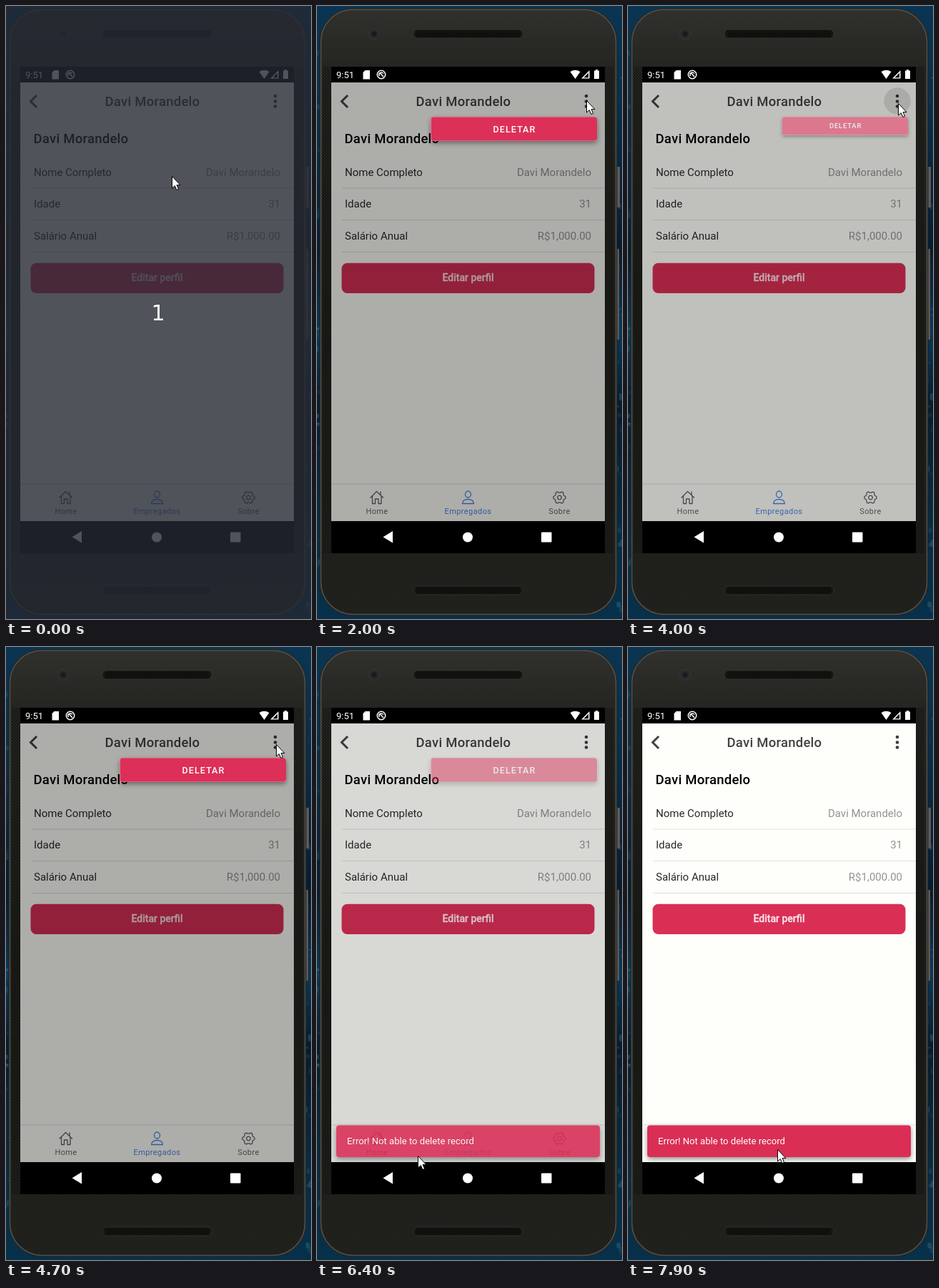
Animation of 427x858 px, one loop 8 s. Source, as an HTML page:

```html
<!DOCTYPE html>
<html lang="pt">
<head>
<meta charset="utf-8">
<title>Perfil</title>
<style>
  html, body { margin: 0; width: 100%; height: 100%; overflow: hidden; background: #08192a; }
  svg { display: block; width: 427px; height: 858px; font-family: Roboto, sans-serif; }
  .title { font-size: 18.5px; font-weight: 500; letter-spacing: .25px; }
  .row { font-size: 15px; fill: #2a2a2a; }
  .note { font-size: 15px; fill: #949494; text-anchor: end; }
  .button { font-size: 14px; font-weight: 500; fill: #fbe3e8; stroke: #fbe3e8; stroke-width: .35px; text-anchor: middle; }
  .tab { font-size: 11px; letter-spacing: .4px; text-anchor: middle; }
  .icon { fill: none; stroke-width: 1.3; stroke-linejoin: round; stroke-linecap: round; }
  .delete { font-size: 12.5px; font-weight: 500; letter-spacing: 1.1px; fill: #fff; text-anchor: middle; }
  .toast { font-size: 13.1px; fill: #fff; }
  .count { font: 30px "DejaVu Sans", sans-serif; fill: #fff; text-anchor: middle; }
</style>
</head>
<body>
<svg viewBox="0 0 427 858">
  <defs>
    <linearGradient id="wall" x2="0" y2="1">
      <stop offset="0" stop-color="#0a3552"/>
      <stop offset=".2" stop-color="#082c47"/>
      <stop offset=".4" stop-color="#061c30"/>
      <stop offset=".53" stop-color="#0a3856"/>
      <stop offset=".65" stop-color="#061c2e"/>
      <stop offset=".85" stop-color="#072c44"/>
      <stop offset="1" stop-color="#07304a"/>
    </linearGradient>
    <linearGradient id="body" x2="0" y2="1">
      <stop offset="0" stop-color="#30302d"/>
      <stop offset=".09" stop-color="#252622"/>
      <stop offset=".5" stop-color="#1c1d19"/>
      <stop offset="1" stop-color="#20211d"/>
    </linearGradient>
    <pattern id="mesh" width="4" height="4" patternUnits="userSpaceOnUse">
      <path d="M0 0h2v2h-2zM2 2h2v2h-2z" fill="#0b0c09"/>
    </pattern>
    <filter id="shadow" x="-10%" y="-30%" width="120%" height="190%">
      <feDropShadow dx="0" dy="3" stdDeviation="3.5" flood-opacity=".42"/>
    </filter>
    <clipPath id="app"><rect x="20" y="107" width="383" height="614"/></clipPath>
  </defs>

  <rect width="427" height="858" fill="url(#wall)"/>
  <g id="streaks" fill="#4b9cc0"></g>

  <!-- phone -->
  <path d="M420 225h4v57h-4zM420 340h3v127h-3z" fill="#625b57"/>
  <rect x="3.500" y="3" width="417" height="850.500" rx="47" fill="#252522"/>
  <rect x="5.500" y="5" width="413" height="846.500" rx="45" fill="url(#body)" stroke="#504f4b" stroke-width="1.500"/>
  <path d="M8 85h12v681H8zM403 85h12v681h-12z" fill="url(#mesh)" opacity=".55"/>
  <g fill="#151612" stroke="#393a36" stroke-width=".6">
    <rect x="135" y="33" width="153" height="12" rx="6"/>
    <rect x="135" y="812" width="153" height="12" rx="6"/>
  </g>
  <path d="M139 34h145v10H139zM139 813h145v10H139z" fill="url(#mesh)"/>
  <circle cx="80" cy="39" r="7.500" fill="#292a28" stroke="#373835"/>
  <circle cx="80" cy="39" r="3.500" fill="#181b20"/>
  <rect x="20" y="85" width="383" height="681"/>

  <!-- status bar -->
  <g fill="#fff">
    <text x="27" y="101" font-size="13">9:51</text>
    <path d="M67.500 90H74v12.500H64.500V93z"/>
    <path d="M354.500 92q7-4.500 14 0l-7 10zM381.500 90v11.500H370z"/>
    <path d="M390 89h3v1.500h2V102h-7V90.500h2z"/>
  </g>
  <path d="M373.500 100.300L380 93.800V100.300z"/>
  <g fill="none" stroke="#fff" stroke-width="1.500">
    <circle cx="90" cy="96" r="5.700"/>
    <path d="M87 98v-3.500q3-3 6 0M87.500 93l5.500 6"/>
  </g>

  <!-- app -->
  <g clip-path="url(#app)">
    <rect x="20" y="107" width="383" height="614" fill="#fefefa"/>
    <circle id="ripple" cx="377" cy="133"/>
    <path d="M43 125l-8.500 8.500L43 142" fill="none" stroke="#444" stroke-width="3"/>
    <g fill="#3c3c3c">
      <circle cx="377" cy="126" r="2.300"/><circle cx="377" cy="133.500" r="2.300"/><circle cx="377" cy="140.500" r="2.300"/>
    </g>
    <text class="title" x="138.500" y="139.500" fill="#424242">Davi Morandelo</text>
    <text class="title" x="38.500" y="191.500">Davi Morandelo</text>
    <text class="row" x="39" y="237.500">Nome Completo</text>
    <text class="row" x="39" y="282">Idade</text>
    <text class="row" x="39" y="327">Salário Anual</text>
    <text class="note" x="384" y="237.500">Davi Morandelo</text>
    <text class="note" x="384" y="282">31</text>
    <text class="note" x="384" y="327">R$1,000.00</text>
    <path d="M35 255h368M35 299.500h368M35 344.500h368M20 669h383" stroke="#dfdfde"/>
    <rect x="34.500" y="359.700" width="354" height="42.300" rx="8" fill="#d92f55"/>
    <text class="button" x="211.500" y="385">Editar perfil</text>

    <g class="icon" stroke="#606060">
      <path d="M75 688l8.500-8.500L92.500 688M77.500 686v10.500h4V690h4.500v6.500h4V686M89 680v4"/>
      <g transform="translate(339.500 688)"><path id="gear"/><circle r="2.800"/></g>
    </g>
    <g class="icon" stroke="#4b85e2">
      <ellipse cx="211.500" cy="683.500" rx="4" ry="4.500"/>
      <path d="M203.500 696.500q.5-6 8-6t8 6z"/>
    </g>
    <text class="tab" x="84" y="711" fill="#666">Home</text>
    <text class="tab" x="211.500" y="711" fill="#4b85e2">Empregados</text>
    <text class="tab" x="339.500" y="711" fill="#666">Sobre</text>

    <rect id="backdrop" x="20" y="107" width="383" height="614"/>
    <g id="popover">
      <rect x="159.500" y="155.200" width="232.500" height="33.500" rx="3.500" fill="#fff" filter="url(#shadow)"/>
      <g id="option">
        <rect x="159.500" y="155.200" width="232.500" height="33.500" rx="3.500" fill="#dd3058"/>
        <text class="delete" x="276.500" y="176.500">DELETAR</text>
      </g>
    </g>
    <g id="toast">
      <rect x="27" y="669.500" width="369" height="44.500" rx="4" fill="#db2f55" filter="url(#shadow)"/>
      <text class="toast" x="42" y="696">Error! Not able to delete record</text>
    </g>
  </g>

  <!-- navigation keys -->
  <g fill="#fff">
    <path d="M106 735v16.500l-13.500-8.200z"/>
    <circle cx="211" cy="743.500" r="7"/>
    <rect x="314" y="736.500" width="14.500" height="14" rx="1"/>
  </g>

  <rect id="shade" width="427" height="858" fill="#252932"/>
  <text id="count" class="count" x="213" y="440">1</text>
  <path id="cursor" d="M.5.5V17l3.800-3.400 2.600 5.900 2.700-1.200-2.500-5.700H12z" fill="#fff" stroke="#000" stroke-linejoin="round"/>
</svg>

<script>
const LOOP = 8000, STEP = 100;
const el = id => document.getElementById(id);
const clamp = v => Math.min(1, Math.max(0, v));

// cubic-bezier timing, solved by bisection
const bezier = (x1, y1, x2, y2) => x => {
  if (x <= 0 || x >= 1) return clamp(x);
  const at = (a, b, u) => 3 * (1 - u) ** 2 * u * a + 3 * (1 - u) * u * u * b + u ** 3;
  let lo = 0, hi = 1;
  for (let i = 0; i < 20; i++) {
    const mid = (lo + hi) / 2;
    if (at(x1, x2, mid) < x) lo = mid; else hi = mid;
  }
  return at(y1, y2, lo);
};
const enter = bezier(.36, .66, .04, 1);
const leave = bezier(.25, .1, .25, 1);

const menus = [
  { open: 1395, shown: 1400, close: 2825 },
  { open: 3860, shown: 4000, close: 6245 }
];
const TOAST = 6250;

// time, x, y: the pointer rests until the next entry
const pointer = [
  [0, 232, 238], [400, 236, 238], [600, 300, 200], [700, 369, 155], [900, 371, 150],
  [1100, 374, 140], [1200, 377, 132], [2300, 345, 290], [2400, 288, 608], [2500, 298, 598],
  [2700, 298, 595], [2900, 289, 591], [3100, 320, 420], [3200, 355, 240], [3300, 373, 133],
  [3500, 384, 111], [3700, 383, 120], [3800, 382, 127], [4000, 378, 136], [4900, 250, 370],
  [5000, 158, 558], [5600, 172, 590], [5700, 189, 623], [5800, 160, 680], [5900, 141, 712],
  [7000, 110, 704], [7100, 70, 700], [7200, 46, 690], [7300, 110, 700], [7400, 200, 704],
  [7500, 290, 706], [7600, 364, 708], [7700, 330, 706], [7800, 260, 704], [7900, 209, 703]
];

function drawStatic() {
  let gear = '';
  for (let i = 0; i < 72; i++) {
    const a = i * Math.PI / 36, r = 7.7 + .9 * Math.tanh(2 * Math.cos(6 * a));
    gear += (i ? 'L' : 'M') + (r * Math.cos(a)).toFixed(2) + ' ' + (r * Math.sin(a)).toFixed(2);
  }
  el('gear').setAttribute('d', gear + 'Z');

  let seed = 7, marks = '';
  const random = () => (seed = seed * 16807 % 2147483647) / 2147483647;
  for (let i = 0; i < 50; i++) {
    const x = i % 2 ? 420 + random() * 7 : random() * 5;
    marks += `<ellipse cx="${x}" cy="${random() * 850}" rx="${1 + random() * 2}" ry="${1 + random() * 5}" opacity="${random() * .3}"/>`;
  }
  el('streaks').innerHTML = marks;
}

function render(t) {
  const menu = menus.findLast(m => t >= m.shown);
  const grow = menu ? enter((t - menu.open) / 500) : 0;
  const stay = menu ? 1 - leave((t - menu.close) / 500) : 0;
  el('backdrop').style.opacity = .32 * grow * stay;
  el('popover').style.opacity = grow * stay;
  el('option').style.opacity = grow;
  el('popover').setAttribute('transform', `translate(392 155.2) scale(${grow}) translate(-392 -155.2)`);

  const age = menu ? t - menu.shown : LOOP;
  el('ripple').setAttribute('r', menu === menus[1] ? 18.7 : 17.3 + clamp(age / 200) * 1.4);
  el('ripple').style.opacity = .115 * (1 - clamp((age - 200) / 300));

  el('toast').style.opacity = enter((t - TOAST) / 400);
  el('shade').style.opacity = t < 400 ? .8 : t < 1100 ? .5 : t < 1200 ? .25 : 0;
  el('count').style.opacity = t < 400 ? 1 : 0;

  const [, x, y] = pointer.findLast(p => t >= p[0]);
  el('cursor').setAttribute('transform', `translate(${x} ${y})`);
}

drawStatic();
render(0);
const start = performance.now();
requestAnimationFrame(function tick() {
  const t = (performance.now() - start) % LOOP;
  render(Math.floor(t / STEP) * STEP);
  requestAnimationFrame(tick);
});
</script>
</body>
</html>
```
